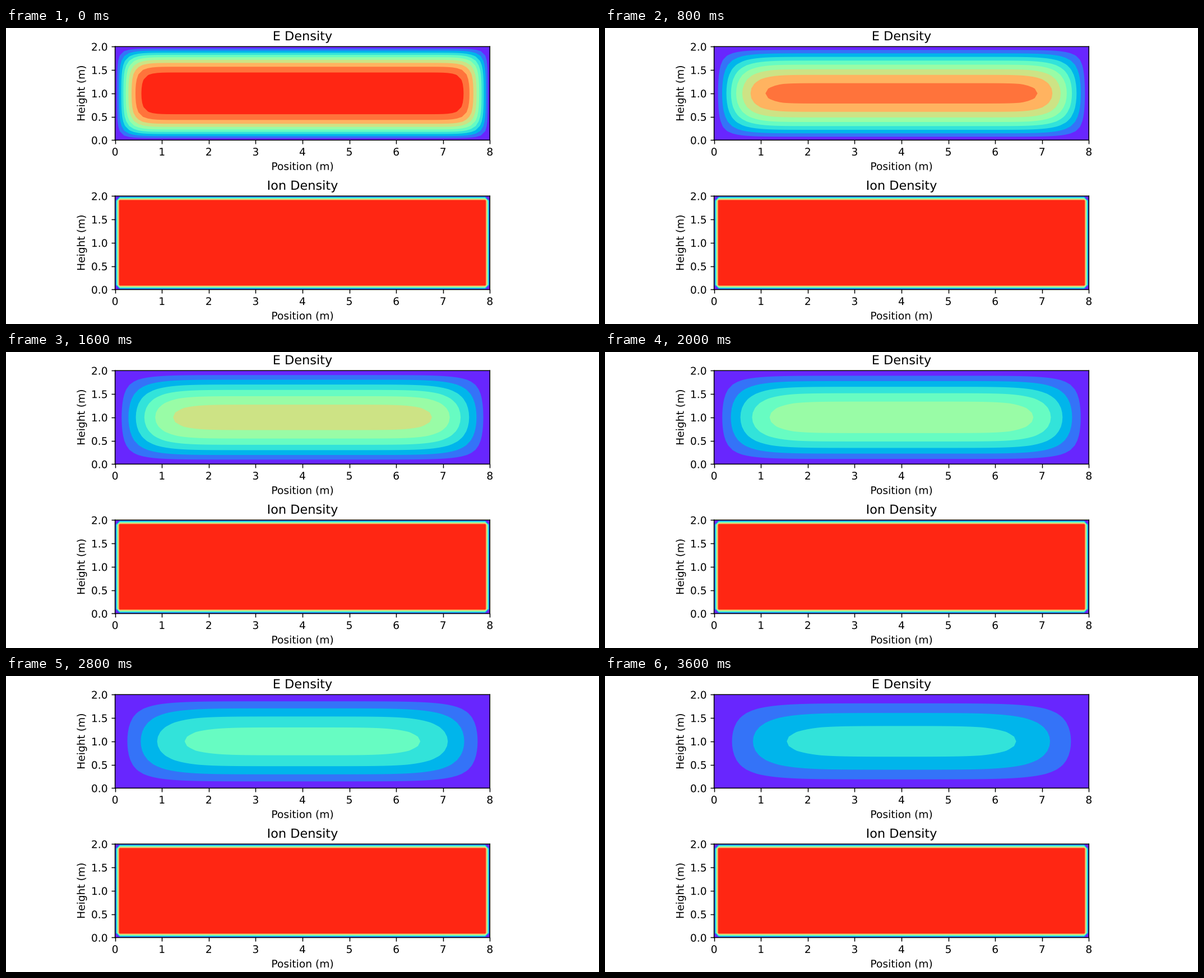
Write a matplotlib script that moves like this. It is 1058 px wide and 529 px high and loops after 4.6 s.

```python
import numpy as np
import matplotlib.pyplot as plt
from matplotlib.animation import FuncAnimation
from matplotlib.patheffects import Normal

W, H, DPI = 1058, 529, 100
S = 1.344  # scale of all point sizes

plt.rcParams.update({
    "font.family": "DejaVu Sans",
    "font.size": 10 * S,
    "text.hinting": "none",
    "axes.titlesize": 12 * S,
    "axes.titlepad": 6 * S,
    "axes.labelpad": 4 * S,
    "axes.linewidth": 0.8 * S,
})

STATES = 10
STEPS_PER_STATE = 25
RATE = 0.21  # D * dt / h^2 on a 0.1 m grid
LEVELS = np.linspace(0, 1, 11)
COLORS = plt.get_cmap("rainbow")((LEVELS[:-1] + LEVELS[1:]) / 2)

x = np.linspace(0, 8, 81)
y = np.linspace(0, 2, 21)


def plasma():
    """Uniform density with empty walls."""
    u = np.zeros((y.size, x.size))
    u[1:-1, 1:-1] = 1
    return u


def diffuse(u, steps):
    u = u.copy()
    for _ in range(steps):
        c = u[1:-1, 1:-1]
        lap = u[2:, 1:-1] + u[:-2, 1:-1] + u[1:-1, 2:] + u[1:-1, :-2] - 4 * c
        u[1:-1, 1:-1] = c + RATE * lap
    return u


def smooth_edges(ax):
    """Place text and frame lines at fractions of a pixel."""
    for text in (ax.title, ax.xaxis.label, ax.yaxis.label,
                 *ax.get_xticklabels(), *ax.get_yticklabels()):
        text.set_path_effects([Normal()])
    for spine in ax.spines.values():
        spine.set_snap(False)


def make_axes(top, title):
    left, width = 194.6, 668.7
    height = width / 4
    ax = fig.add_axes([left / W, 1 - (top + height) / H, width / W, height / H])
    ax.set(xlim=(0, 8), ylim=(0, 2), xticks=range(9),
           yticks=[0, 0.5, 1, 1.5, 2], title=title,
           xlabel="Position (m)", ylabel="Height (m)")
    ax.tick_params(length=3.5 * S, width=0.8 * S, pad=3.5 * S)
    ax.set_facecolor(COLORS[0])
    smooth_edges(ax)
    return ax


def fill_bands(ax, u):
    """Stack the bands from low to high so that no seams show."""
    return [ax.contourf(x, y, u, levels=[low, 2], colors=[color],
                        antialiased=True)
            for low, color in zip(LEVELS[1:-1], COLORS[1:]) if low < u.max()]


fig = plt.figure(figsize=(W / DPI, H / DPI), dpi=DPI, facecolor="white")
electron_ax = make_axes(33.2, "E Density")
ion_ax = make_axes(300.3, "Ion Density")
fill_bands(ion_ax, plasma())

densities = [diffuse(plasma(), 1 + STEPS_PER_STATE * (k + 1))
             for k in range(STATES)]
bands = []


def update(i):
    while bands:
        bands.pop().remove()
    # two ticks per state, the last state holds longer
    bands.extend(fill_bands(electron_ax, densities[min(i // 2, STATES - 1)]))
    return []


anim = FuncAnimation(fig, update, frames=23, interval=200,
                     init_func=lambda: update(0), repeat=True, repeat_delay=0)
plt.show()
```
